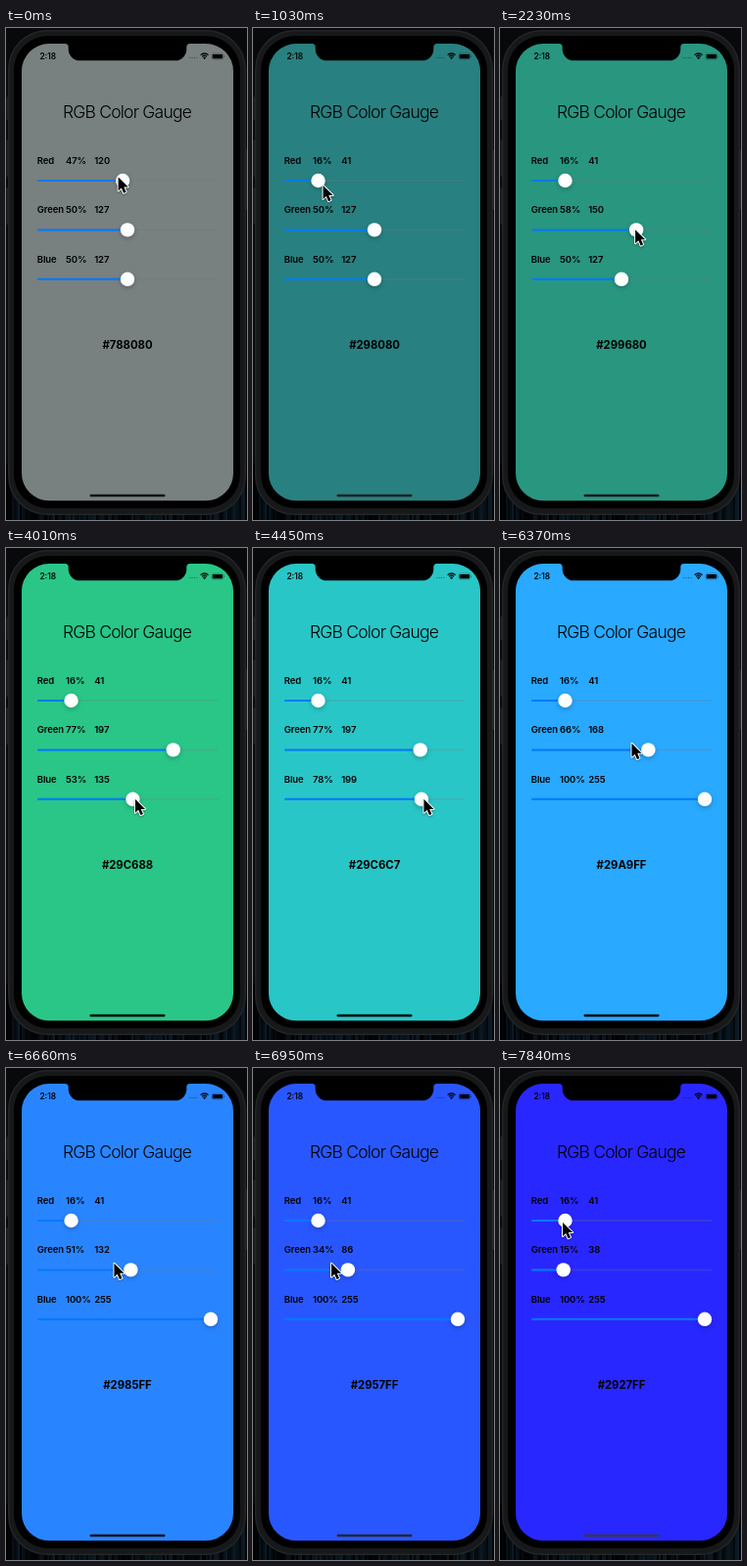
These frames come from a looping animation (246 by 503 pixels, 7990 ms). An HTML page with a canvas:

```html
<!DOCTYPE html>
<html lang="en">
<head>
<meta charset="utf-8">
<title>RGB Color Gauge</title>
<style>
html, body { margin: 0; width: 100%; height: 100%; overflow: hidden; background: #07090a; }
canvas { display: block; width: 246px; height: 503px; }
</style>
</head>
<body>
<canvas id="stage"></canvas>
<script>
const W = 246, H = 503, LOOP = 7990, STEPS = 54;
const canvas = document.getElementById('stage');
const ctx = canvas.getContext('2d');
const ratio = window.devicePixelRatio || 1;
canvas.width = Math.round(W * ratio);
canvas.height = Math.round(H * ratio);
ctx.scale(ratio, ratio);

const NAMES = ['Red', 'Green', 'Blue'];
const rowY = row => 156 + 50.4 * row;
const knobX = value => 39 + 170 * value / 255;

// Each drag moves one slider as progress ** power; dx, dy place the pointer on the knob.
const drags = [
  { row: 0, start: 0, end: 6, from: 120.2, to: 41.3, power: 1, dx: -5, dy: -4 },
  { row: 1, start: 10, end: 17, from: 127.5, to: 197.6, power: 3.35, dx: -1.5, dy: -0.7 },
  { row: 2, start: 24, end: 31.2, from: 127.5, to: 255, power: 3.14, dx: 2, dy: -0.5 },
  { row: 1, start: 40, end: 48.8, from: 197.6, to: 38.6, power: 1.58, dx: -17.4, dy: -7.2 },
  { row: 0, start: 53, end: 54, from: 41.3, to: 41.3, power: 1, dx: -3, dy: 1.5 }
];

const clamp = v => Math.min(1, Math.max(0, v));
const mix = (a, b, p) => a + (b - a) * p;
const smooth = p => p * p * (3 - 2 * p);

function dragValue(d, step) {
  return mix(d.from, d.to, clamp((step - d.start) / (d.end - d.start)) ** d.power);
}

function level(row, step) {
  const own = drags.filter(d => d.row === row);
  return dragValue(own.findLast(d => d.start <= step) || own[0], step);
}

function grip(d, step) {
  return [knobX(dragValue(d, step)) + d.dx, rowY(d.row) + d.dy];
}

function pointerAt(step) {
  const i = drags.findLastIndex(d => d.start <= step);
  const here = grip(drags[i], step), next = drags[i + 1];
  if (step <= drags[i].end || !next) return here;
  const p = smooth((step - drags[i].end) / (next.start - drags[i].end));
  return grip(next, next.start).map((v, k) => mix(here[k], v, p));
}

function seeded(seed) {
  return () => (seed = seed * 16807 % 2147483647) / 2147483647;
}

function box(x, y, w, h, r, color) {
  ctx.fillStyle = color;
  ctx.beginPath();
  ctx.roundRect(x, y, w, h, r);
  ctx.fill();
}

function text(str, x, y, size, weight, spacing = 0, align = 'left') {
  ctx.font = `${weight} ${size}px Inter, sans-serif`;
  ctx.letterSpacing = spacing + 'px';
  ctx.textAlign = align;
  ctx.fillStyle = '#000';
  ctx.fillText(str, x, y);
}

function drawDesktop() {
  box(0, 0, W, H, 0, '#07090a');
  const random = seeded(77);
  for (let x = 0; x < W; x += 2) {
    const light = random() * 30, top = 440 + random() * 40;
    box(x, top, 2, H - top, 0, `rgb(${light * 0.4},${light * 0.9},${light * 1.3})`);
  }
}

function drawNotch() {
  const left = 63.7, right = 184.3, top = 16, bottom = 33.3;
  ctx.fillStyle = '#000';
  ctx.beginPath();
  ctx.moveTo(left - 4, top - 1);
  ctx.lineTo(left - 4, top);
  ctx.arcTo(left, top, left, top + 4, 3.5);
  ctx.arcTo(left, bottom, left + 12, bottom, 11.5);
  ctx.arcTo(right, bottom, right, bottom - 12, 11.5);
  ctx.arcTo(right, top, right + 4, top, 3.5);
  ctx.lineTo(right + 4, top - 1);
  ctx.fill();
}

function drawPhone(background, luma) {
  for (const y of [70, 114, 163]) box(0.5, y, 3, y > 100 ? 38 : 24, 1, '#202123');
  box(243.5, 124, 2.5, 62, 1, '#202123');
  box(2, 2, 243, 496, 40, '#242526');
  box(3.5, 3.5, 240, 493, 38.5, '#171819');
  box(8, 8, 231, 483, 35, '#000');
  box(16, 16, 216, 467.3, 28, background);
  drawNotch();

  const grey = Math.max(0, 150 - luma) * 0.65;
  box(85.5, 476.7, 77, 2.6, 1.3, `rgb(${grey},${grey},${grey * 1.15})`);
}

function drawStatus() {
  text('2:18', 34.4, 32, 8.3, 600);
  for (let i = 0; i < 4; i++) box(187 + i * 2.4, 29.8, 1.3, 1.3, 0.65, 'rgba(0,0,0,.4)');

  ctx.strokeStyle = '#000';
  ctx.lineWidth = 1.3;
  for (const r of [3.4, 5.6]) {
    ctx.beginPath();
    ctx.arc(202.6, 31.6, r, -Math.PI * 0.75, -Math.PI * 0.25);
    ctx.stroke();
  }
  ctx.fillStyle = '#000';
  ctx.beginPath();
  ctx.moveTo(202.6, 32);
  ctx.arc(202.6, 31.6, 1.9, -Math.PI * 0.8, -Math.PI * 0.2);
  ctx.fill();

  ctx.strokeStyle = 'rgba(0,0,0,.45)';
  ctx.lineWidth = 0.6;
  ctx.beginPath();
  ctx.roundRect(210, 26.2, 11.8, 5.8, 1.7);
  ctx.stroke();
  box(210.8, 27, 10.2, 4.2, 1, '#000');
  box(222.3, 28.2, 0.8, 1.8, 0.4, 'rgba(0,0,0,.45)');
}

function drawSlider(row, value) {
  const x = knobX(value), y = rowY(row), base = y - 17;
  const label = (str, left) => text(str, left, base, 9.5, 600, -0.1);
  label(NAMES[row], 31.8);
  label(Math.floor(value / 255 * 100) + '%', 61, base);
  label(Math.floor(value), 90.2);

  box(32, y - 1, 184.5, 2, 1, 'rgba(120,120,128,.22)');
  box(32, y - 1, x - 32, 2, 1, '#007aff');
  ctx.save();
  ctx.shadowColor = 'rgba(0,0,0,.22)';
  ctx.shadowBlur = 5 * ratio;
  ctx.shadowOffsetY = 2 * ratio;
  box(x - 7.2, y - 7.2, 14.4, 14.4, 7.2, '#fff');
  ctx.restore();
}

function drawPointer([x, y]) {
  ctx.save();
  ctx.translate(x, y);
  ctx.beginPath();
  for (const [px, py] of [[0.5, 0.5], [0.5, 14.5], [3.7, 11.5], [6, 16.8],
    [8.5, 15.7], [6.2, 10.6], [10.6, 10.6]]) ctx.lineTo(px, py);
  ctx.closePath();
  ctx.shadowColor = 'rgba(0,0,0,.35)';
  ctx.shadowBlur = 2 * ratio;
  ctx.shadowOffsetY = ratio;
  ctx.lineJoin = 'round';
  ctx.lineWidth = 2;
  ctx.strokeStyle = '#fff';
  ctx.stroke();
  ctx.shadowColor = 'transparent';
  ctx.fillStyle = '#000';
  ctx.fill();
  ctx.restore();
}

function draw(step) {
  const levels = NAMES.map((_, row) => level(row, step));
  const rgb = levels.map(Math.round);
  const hex = '#' + rgb.map(v => v.toString(16).padStart(2, '0')).join('').toUpperCase();
  const luma = 0.3 * rgb[0] + 0.59 * rgb[1] + 0.11 * rgb[2];

  drawDesktop();
  drawPhone(hex, luma);
  drawStatus();
  text('RGB Color Gauge', 123.5, 91.5, 17.5, 300, -0.78, 'center');
  levels.forEach((value, row) => drawSlider(row, value));
  text(hex, 124, 327.6, 11.3, 700, 0, 'center');
  drawPointer(pointerAt(step));
}

// Time advances in even steps, rounded to hundredths of a second.
function tick() {
  const time = performance.now() % LOOP;
  draw(Math.min(STEPS - 1, Math.floor((time + 10) * STEPS / LOOP)));
  requestAnimationFrame(tick);
}
tick();
</script>
</body>
</html>
```
